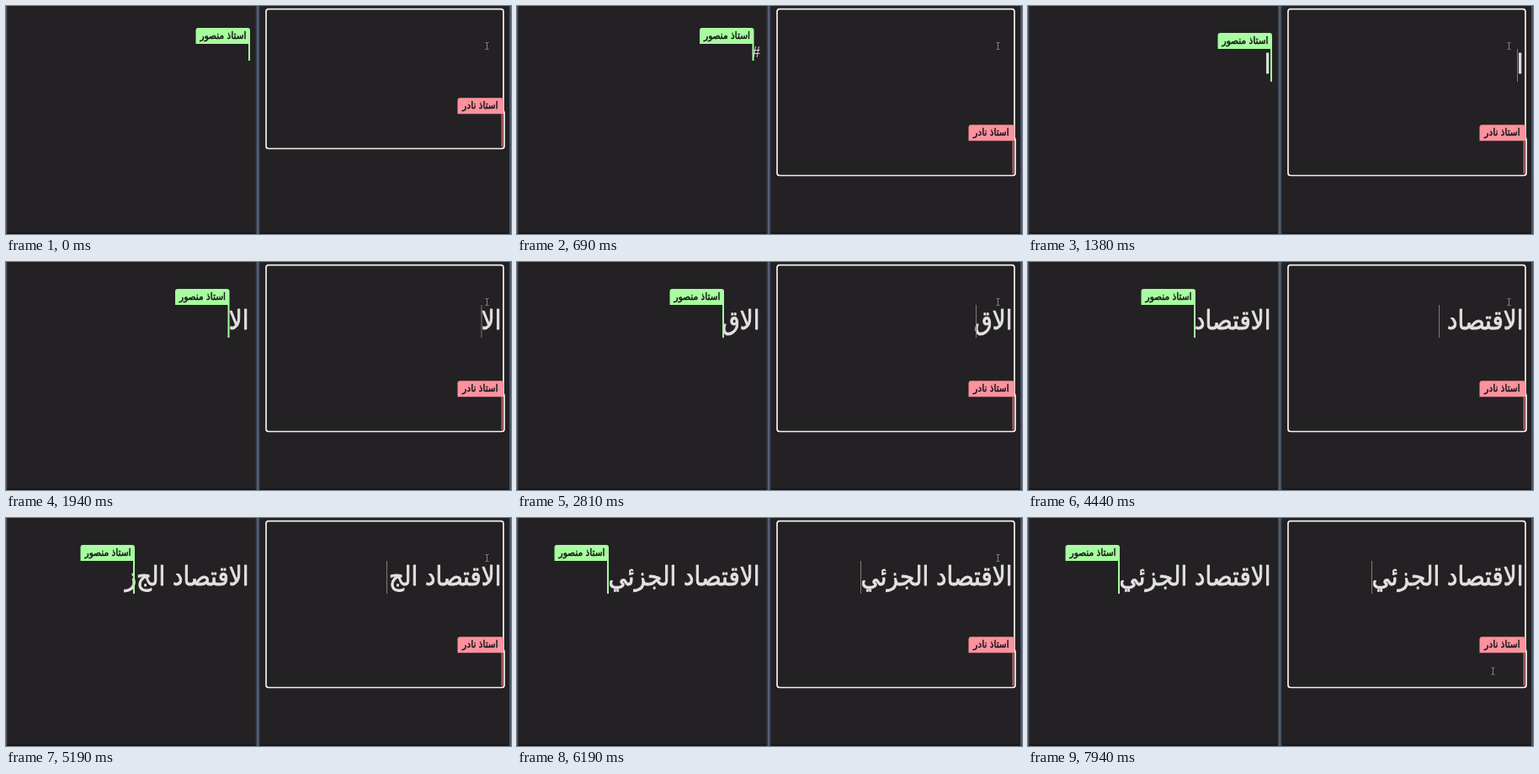
Animation of 600 by 271 pixels, one loop 8000 ms. Source, as an HTML page:

```html
<!DOCTYPE html>
<html lang="ar">
<head>
<meta charset="utf-8">
<title>Shared notes</title>
<style>
  html, body { margin: 0; width: 100%; height: 100%; overflow: hidden; background: #232123; }
  svg { display: block; width: 600px; height: 271px; }
  text { direction: rtl; white-space: pre; }
  .heading, .name { font-family: "DejaVu Sans", sans-serif; font-stretch: condensed; stroke-linejoin: round; }
  .heading { fill: #e4e1e2; stroke: #e4e1e2; stroke-width: .8; }
  .name { text-anchor: middle; fill: #151515; stroke: #151515; stroke-width: .45; }
  #hash { font: 19px "Liberation Serif", serif; fill: #d8d6d7; }
</style>
</head>
<body>
<svg viewBox="0 0 600 271">
  <rect width="600" height="271" fill="#232123"/>
  <rect y="269" width="600" height="2" fill="#1b181c"/>
  <rect width="1.3" height="271" fill="#465365"/>
  <rect x="296.5" width="5" height="271" fill="#343a46"/>
  <rect x="298" width="2.4" height="271" fill="#526077"/>
  <rect x="598" width="2" height="271" fill="#48546a"/>

  <text id="hash" x="289" y="61">#</text>
  <text id="leftText" class="heading" x="288.5" y="79.5"></text>
  <g id="writer">
    <path d="M-64.5 19V3q0-3 3-3H-3q3 0 3 3V19z" fill="#a7fd9f"/>
    <text class="name" x="-32" y="13">استاذ منصور</text>
    <rect id="writerBar" x="-2" y="19" width="2" height="20" fill="#a7fd9f"/>
  </g>

  <path id="outline" fill="none" stroke="#f4f2f3" stroke-width="1.7"/>
  <text id="rightText" class="heading" x="588.5" y="79.5"></text>
  <rect id="rightBar" y="51" width="1" height="39" fill="#7d7b7c"/>
  <g id="reader">
    <rect x="588.6" y="19" width="1.8" height="39" fill="#c9686f"/>
    <path d="M536.5 19V3q0-3 3-3H588q3 0 3 3V19z" fill="#fc929e"/>
    <text class="name" x="563.5" y="13">استاذ نادر</text>
  </g>
  <path id="pointer" d="M-2-4H-.5L0-3.500 .5-4H2M0-3.500V3.500M-2 4H-.5L0 3.500 .5 4H2"
        fill="none" stroke="#a3a1a2" stroke-width=".8"/>
</svg>
<script>
const $ = id => document.getElementById(id);
const LOOP = 8000, RIGHT_LAG = 60, CARET_LAG = 100;
const HASH_AT = 300, GROW_AT = 600, HEADING_AT = 900;
const START_X = 290;

// time, letter, caret x after the letter
const keys = [
  [1300, 'ا', 282], [1690, 'ل', 270], [1820, 'ا', 265.5], [2560, 'ق', 246],
  [2950, 'ت', 232], [3540, 'ص', 207], [3900, 'ا', 214], [4130, 'د', 199],
  [4380, ' ', 189], [4600, 'ا', 180.5], [4940, 'ل', 169], [5030, 'ج', 153],
  [5160, 'ز', 138], [5720, 'ئ', 128], [5860, 'ي', 109]
];
const full = keys.map(k => k[1]).join('');

// Font size at which a string naturally has the given width
const pen = document.createElement('canvas').getContext('2d');
pen.font = 'condensed 100px "DejaVu Sans", sans-serif';
const sizeFor = (s, width) => 100 * width / pen.measureText(s).width;
const setSize = (selector, size) =>
  document.querySelectorAll(selector).forEach(el => el.style.fontSize = size + 'px');
setSize('.heading', sizeFor(full, 180));
setSize('.name', sizeFor(document.querySelector('.name').textContent, 55));

const typed = t => keys.filter(k => k[0] <= t).length;
const caretX = n => n ? keys[n - 1][2] : START_X;
const show = (el, on) => el.setAttribute('visibility', on ? 'visible' : 'hidden');
const setText = (el, s) => { if (el.textContent !== s) el.textContent = s; };
const move = (el, x, y) => el.setAttribute('transform', `translate(${x} ${y})`);

function drawLeft(t) {
  const heading = t >= HEADING_AT;
  const n = typed(t), seen = typed(t - CARET_LAG);
  // A caret inside the word breaks the letters' joining
  setText($('leftText'), full.slice(0, seen) + (n > seen && seen ? '\u200c' : '') + full.slice(seen, n));
  show($('hash'), t >= HASH_AT && !heading);
  const x = !heading && t >= HASH_AT + CARET_LAG ? 281.5 : caretX(seen);
  move($('writer'), x, heading ? 32 : 26);
  $('writerBar').setAttribute('height', heading ? 39 : 20);
}

function drawRight(t) {
  const n = typed(t - RIGHT_LAG);
  setText($('rightText'), full.slice(0, n));
  const sinceKey = n ? t - RIGHT_LAG - keys[n - 1][0] : 0;
  show($('rightBar'), n > 0 && sinceKey % 1000 < 500);
  $('rightBar').setAttribute('x', caretX(n) + 299);

  const bottom = t >= GROW_AT ? 201.5 : 169.5;
  const top = bottom - 60.2;
  $('outline').setAttribute('d',
    `M591 ${top + 15}V6.6q0-3-3-3H312q-3 0-3 3V${bottom - 3}q0 3 3 3H589q3 0 3-3V${top + 18}q0-3-2-3`);
  move($('reader'), 0, top);
}

function drawPointer(t) {
  const p = Math.min(1, Math.max(0, (t - 6650) / 750));
  const e = p * p * (3 - 2 * p);
  const bend = (a, b, c) => a * (1 - e) ** 2 + 2 * b * e * (1 - e) + c * e * e;
  move($('pointer'), bend(571.5, 595, 552.5), bend(47.5, 115, 182));
}

const start = performance.now();
function frame() {
  const t = (performance.now() - start) % LOOP;
  drawLeft(t);
  drawRight(t);
  drawPointer(t);
  requestAnimationFrame(frame);
}
frame();
</script>
</body>
</html>
```
